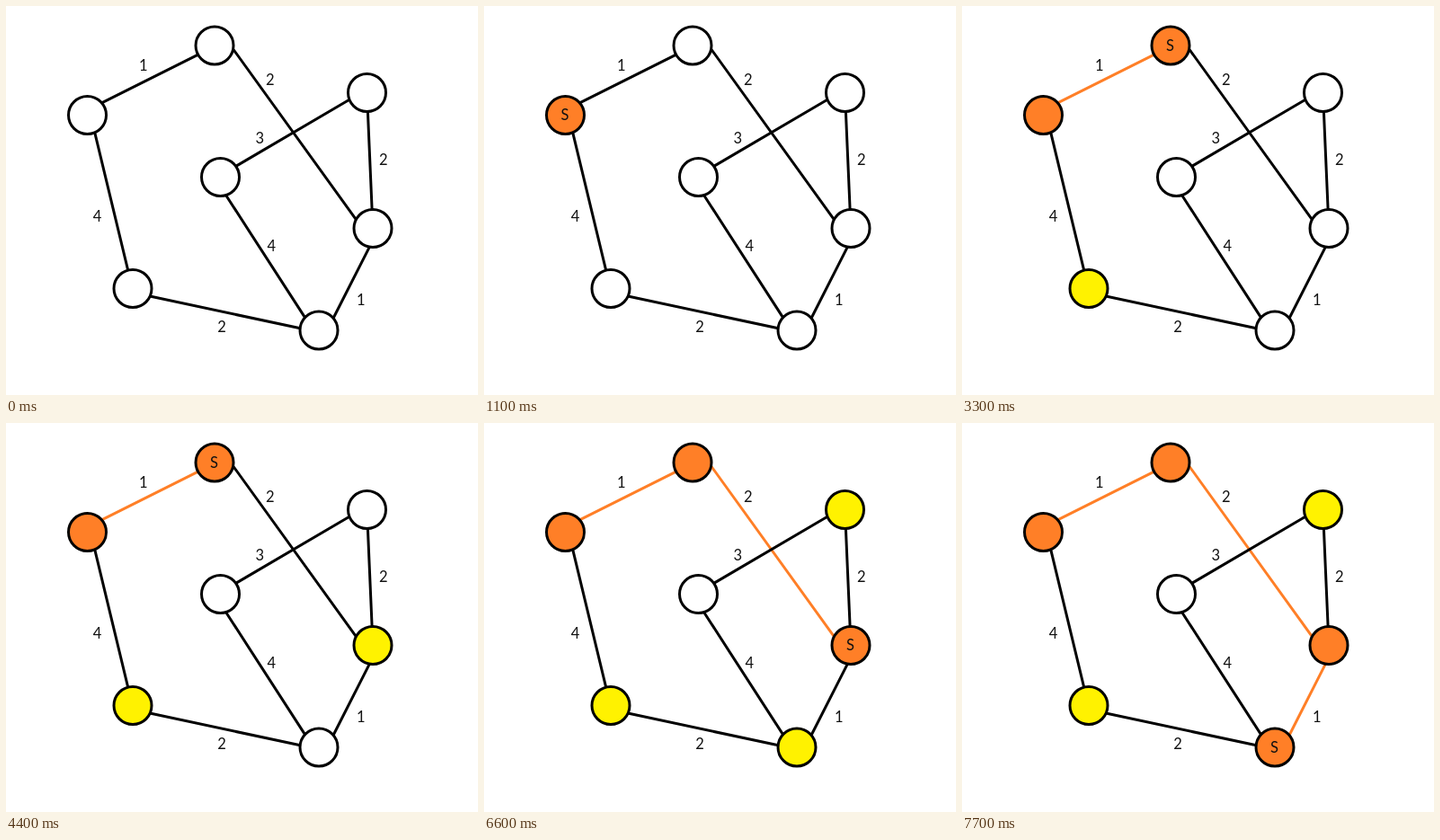
Recreate the animation shown at these times as an HTML page. Size 525 px wide and 433 px high, loop 8 s.

```html
<!DOCTYPE html>
<html lang="en">
<head>
<meta charset="utf-8">
<title>Growing a minimum spanning tree</title>
<style>
  html, body { margin: 0; width: 100%; height: 100%; overflow: hidden; background: #fff; }
  svg { display: block; width: 525px; height: 433px; }
  line { stroke-width: 3; stroke-linecap: round; }
  circle { stroke: #000; stroke-width: 3; }
  text { font: 16.5px Lato, "Open Sans", sans-serif; text-anchor: middle; fill: #111; }
</style>
</head>
<body>
<svg id="stage" viewBox="0 0 525 433"></svg>
<script>
const ORANGE = '#ff7f27', YELLOW = '#fff200', STEP = 1100, LOOP = 8000;
const RADIUS = 21, REACH = 22, BASELINE = 5.75;

const nodes = {
  A: [90.5, 121.5], B: [232, 44], C: [401.5, 96.5], D: [238.5, 190.5],
  E: [408, 247.5], F: [348, 361], G: [141, 314.5]
};

// leave, enter: degrees by which an end slides round its node's rim
// at, gap: label position along the edge and sideways from it
const edges = [
  { ends: 'AB', weight: 1, gap: -16, leave: -11 },
  { ends: 'BE', weight: 2, gap: -13, at: 0.22, leave: -36, enter: -20 },
  { ends: 'DC', weight: 3, gap: -13, at: 0.26, leave: -5, enter: 8 },
  { ends: 'CE', weight: 2, gap: -15 },
  { ends: 'AG', weight: 4, gap: 19, at: 0.58, leave: -8 },
  { ends: 'DF', weight: 4, gap: -12, at: 0.46, leave: 15, enter: -14 },
  { ends: 'GF', weight: 2, gap: 17, leave: 11, enter: -6 },
  { ends: 'EF', weight: 1, gap: -18, at: 0.64, leave: -17, enter: 21 }
];

const stage = document.getElementById('stage');
function add(tag, attrs, content = '') {
  const el = document.createElementNS('http://www.w3.org/2000/svg', tag);
  for (const key in attrs) el.setAttribute(key, attrs[key]);
  el.textContent = content;
  return stage.appendChild(el);
}

function rimPoint([x, y], angle) {
  return [x + REACH * Math.cos(angle), y + REACH * Math.sin(angle)];
}

function addEdge({ ends, weight, gap, at = 0.5, leave = 0, enter = 0 }) {
  const [from, to] = [...ends].map(id => nodes[id]);
  const heading = Math.atan2(to[1] - from[1], to[0] - from[0]);
  const [x1, y1] = rimPoint(from, heading + leave * Math.PI / 180);
  const [x2, y2] = rimPoint(to, heading + Math.PI + enter * Math.PI / 180);
  const dx = x2 - x1, dy = y2 - y1, length = Math.hypot(dx, dy);
  add('text', {
    x: x1 + dx * at - dy / length * gap,
    y: y1 + dy * at + dx / length * gap + BASELINE
  }, weight);
  return add('line', { x1, y1, x2, y2 });
}

const lines = edges.map(addEdge);
const circles = {};
for (const id in nodes) {
  const [cx, cy] = nodes[id];
  circles[id] = add('circle', { cx, cy, r: RADIUS });
}
const mark = add('text', {}, 'S');

// Prim's search: visit a node, show its neighbours, then take the cheapest edge out
function search(stepCount) {
  const visited = [], frontier = new Set(), walked = [], steps = [];
  const record = () => steps.push({
    visited: [...visited], frontier: [...frontier], walked: [...walked]
  });
  const leaving = () => edges.filter(({ ends }) =>
    visited.includes(ends[0]) !== visited.includes(ends[1]));
  const outside = ({ ends }) => [...ends].find(id => !visited.includes(id));

  record();
  let next = 'A';
  while (steps.length < stepCount) {
    visited.push(next);
    record();
    leaving().forEach(edge => frontier.add(outside(edge)));
    record();
    const cheapest = leaving().sort((a, b) => a.weight - b.weight)[0];
    next = outside(cheapest);
    walked.push(cheapest);
  }
  return steps;
}

function show({ visited, frontier, walked }) {
  edges.forEach((edge, i) =>
    lines[i].setAttribute('stroke', walked.includes(edge) ? ORANGE : '#000'));
  for (const id in circles)
    circles[id].setAttribute('fill',
      visited.includes(id) ? ORANGE : frontier.includes(id) ? YELLOW : '#fff');
  const current = nodes[visited.at(-1)];
  mark.setAttribute('visibility', current ? 'visible' : 'hidden');
  if (current) {
    mark.setAttribute('x', current[0] - 0.5);
    mark.setAttribute('y', current[1] + BASELINE);
  }
}

const steps = search(Math.ceil(LOOP / STEP));
const start = performance.now();
function tick() {
  const time = (performance.now() - start) % LOOP;
  show(steps[Math.floor(time / STEP)]);
  requestAnimationFrame(tick);
}
tick();
</script>
</body>
</html>
```
